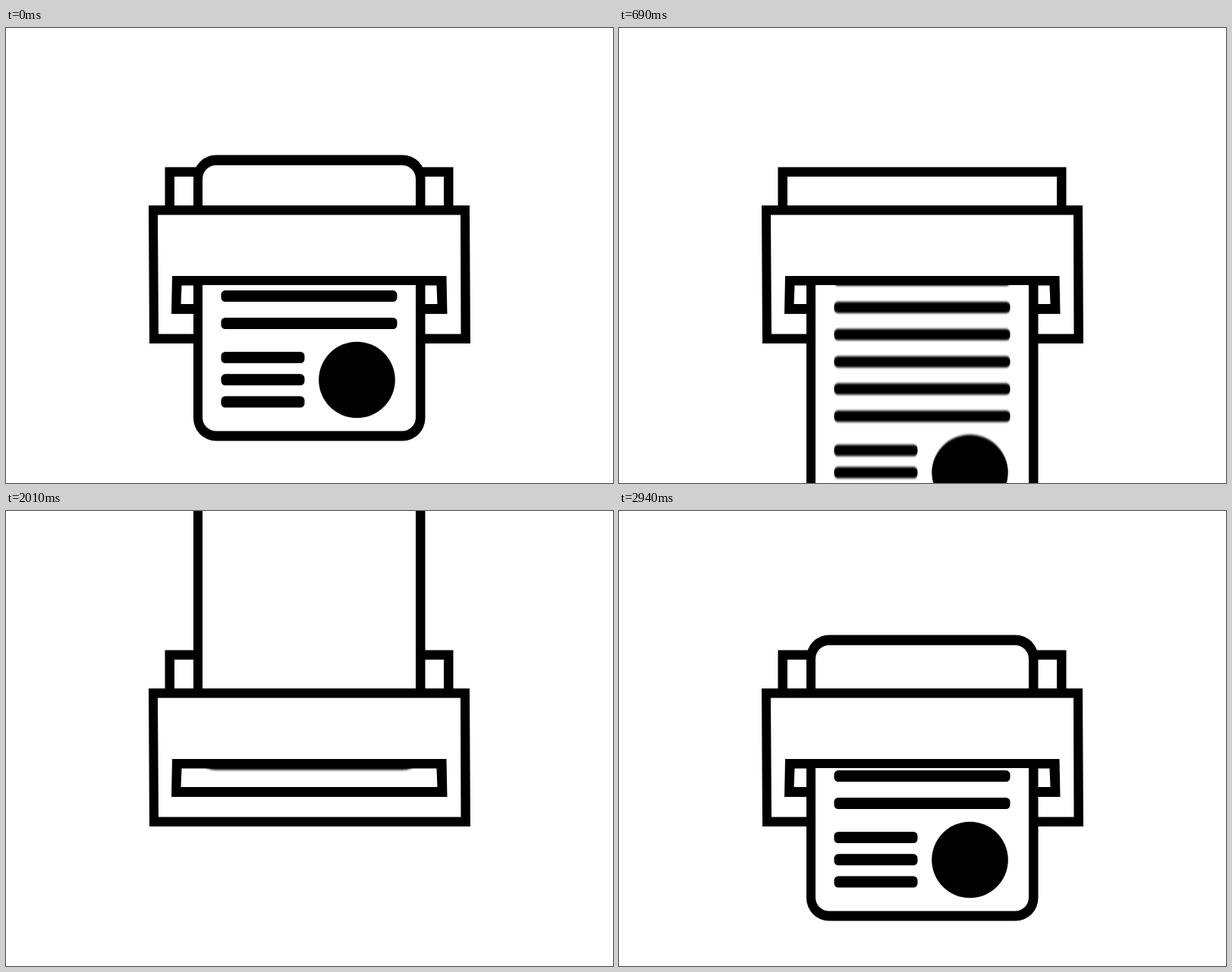
An HTML page that plays this animation: 800 px wide and 600 px high, repeating every 2.97 s.

```html
<!DOCTYPE html>
<html lang="en">
<head>
<meta charset="utf-8">
<title>Printer</title>
<style>
  html, body { margin: 0; width: 100%; height: 100%; overflow: hidden; background: #fff; }
  svg { display: block; width: 100%; height: 100%; }
</style>
</head>
<body>
<svg viewBox="0 0 800 600">
  <defs>
    <clipPath id="above"><rect width="800" height="236"/></clipPath>
    <clipPath id="below"><rect y="339" width="800" height="261"/></clipPath>
    <filter id="smear" filterUnits="userSpaceOnUse" x="230" y="130" width="340" height="452"
            color-interpolation-filters="sRGB">
      <feGaussianBlur stdDeviation="0 0"/>
    </filter>
    <g id="sheet">
      <rect x="247" y="167.5" width="305.5" height="377" rx="30"/>
      <rect x="259" y="181" width="281" height="350.5" rx="18" fill="#fff"/>
    </g>
  </defs>

  <path d="M209.5 183.5H589.5V246H209.5Z"/>
  <path d="M222 196H577V246H222Z" fill="#fff"/>

  <g clip-path="url(#above)">
    <g class="paper" filter="url(#smear)"><use href="#sheet"/></g>
  </g>

  <path d="M188 234H611L612 416H189Z"/>
  <path d="M200 246.5H599L599.5 403.5H201Z" fill="#fff"/>
  <path d="M219 327H580.5L581.5 377H218Z"/>
  <path d="M231.5 339.5H567.5L568.5 364H230.5Z" fill="#fff"/>

  <g clip-path="url(#below)">
    <g class="paper" filter="url(#smear)">
      <use href="#sheet"/>
      <g id="print"><circle cx="462.5" cy="464" r="50.3"/></g>
    </g>
  </g>
</svg>
<script>
const LOOP = 2970, TICK = 30, ENTER = 1650, EXIT = 1050;

// Paper feed: time (ms), vertical offset (px), speed (px/ms)
const feed = [
  [1650, -517, 1.41], [2010, -203, 0.33], [2160, -168, 0.19],
  [2580, -96, 0.19], [2700, -71, 0.25], [2940, -4, 0.16],
  [2970, 0, 0.12], [3420, 61.7, 0.19], [3660, 122.5, 0.33],
  [4020, 436, 1.41]
];

const papers = document.querySelectorAll('.paper');
const blur = document.querySelector('feGaussianBlur');
const print = document.getElementById('print');

function addBar(cy, width) {
  const bar = document.createElementNS('http://www.w3.org/2000/svg', 'rect');
  const box = { x: 283.5, y: cy - 7.5, width, height: 15, rx: 5.5 };
  for (const key in box) bar.setAttribute(key, box[key]);
  print.append(bar);
}
for (let i = 0; i < 6; i++) addBar(210 + i * 35.9, 232);
for (let i = 0; i < 3; i++) addBar(434.5 + i * 29.3, 110);

// Cubic Hermite interpolation of the feed table
function offsetAt(t) {
  const i = Math.max(1, feed.findIndex(p => p[0] >= t));
  const [t0, y0, v0] = feed[i - 1], [t1, y1, v1] = feed[i];
  const d = t1 - t0, u = (t - t0) / d, w = 1 - u;
  return w * w * ((1 + 2 * u) * y0 + u * d * v0) +
         u * u * ((3 - 2 * u) * y1 - w * d * v1);
}

function draw(now) {
  const t = Math.floor(now % LOOP / TICK) * TICK;
  const hidden = t >= EXIT && t < ENTER;
  papers.forEach(p => p.style.display = hidden ? 'none' : '');
  if (hidden) return;
  const time = t < EXIT ? t + LOOP : t;
  const y = offsetAt(time);
  const a = Math.max(time - 5, ENTER), b = Math.min(time + 5, LOOP + EXIT);
  const speed = (offsetAt(b) - offsetAt(a)) / (b - a);
  papers.forEach(p => p.setAttribute('transform', `translate(0 ${y.toFixed(2)})`));
  blur.setAttribute('stdDeviation', `0 ${(speed * 4).toFixed(2)}`);
}

const start = performance.now();
function frame() {
  draw(performance.now() - start);
  requestAnimationFrame(frame);
}
frame();
</script>
</body>
</html>
```
